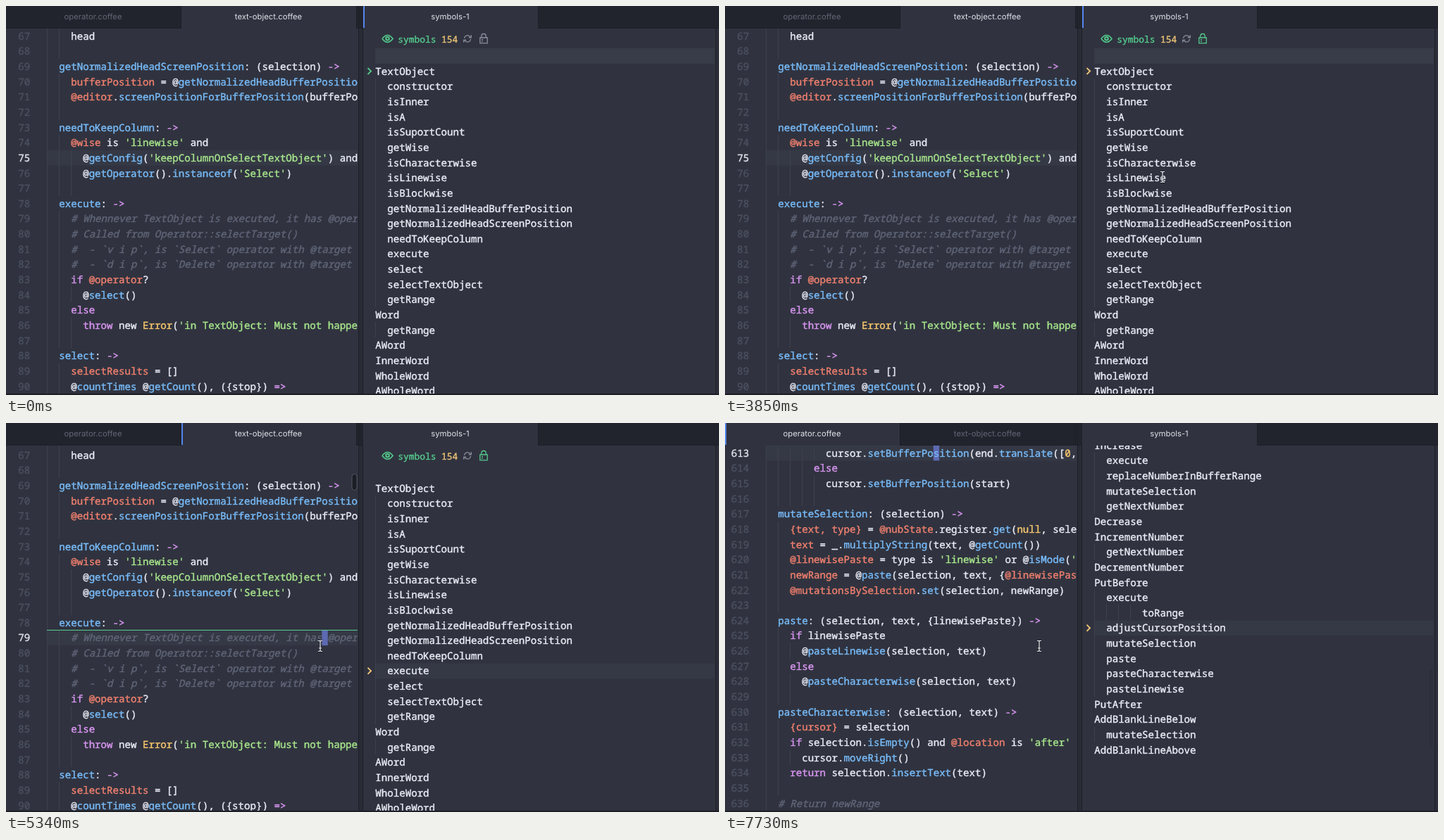
These frames come from a looping animation (1012x553 px, 8 s). An HTML page with a canvas:

```html
<!DOCTYPE html>
<html lang="en">
<head>
<meta charset="utf-8">
<title>Symbol list</title>
<style>
  html, body { margin: 0; width: 100%; height: 100%; overflow: hidden; background: #30333f; }
  canvas { display: block; }
</style>
</head>
<body>
<canvas id="stage" width="1012" height="553"></canvas>
<script>
const ctx = document.getElementById('stage').getContext('2d');
const LOOP = 8000, ROW = 21.65, CHAR = 8.478;
const CODE_X = 58.3, LIST_X = 524.3, TOP = 31.8;
const MONO = '"Noto Sans Mono", "DejaVu Sans Mono", monospace';
const CODE_FONT = `14.13px ${MONO}`;
const TAB_FONT = '11.3px Inter, Roboto, sans-serif';

const BG = '#30333f', BAR = '#21242c', EDGE = '#1c1f26', GUIDE = '#3d414e';
const ACTIVE = '#353945', BLUE = '#5686f0', BLOCK = '#5d69b1';
const GREEN = '#54ca8d', YELLOW = '#ecc376', GREY = '#8b909e';
const INK = {
  w: '#ebeef8', b: '#79bdfb', r: '#f2806f', p: '#da96f3',
  g: '#a9e88d', y: '#f9c86e', c: '#606578'
};

// Each run is separated by "|" and begins with its colour key.
const objectCode = `    whead

  bgetNormalizedHeadScreenPosition|w: (selection) |p->
    rbufferPosition|w = @|bgetNormalizedHeadBufferPosition
    r@editor|w.|bscreenPositionForBufferPosition|w(bufferPosition)

  bneedToKeepColumn|w: |p->
    r@wise|w is |g'linewise'|w and
      w@|bgetConfig|w(|g'keepColumnOnSelectTextObject'|w) and
      w@|bgetOperator|w().|binstanceof|w(|g'Select'|w)

  bexecute|w: |p->
    c# Whennever TextObject is executed, it has @operator
    c# Called from Operator::selectTarget()
    c#  - \`v i p\`, is \`Select\` operator with @target
    c#  - \`d i p\`, is \`Delete\` operator with @target
    pif |r@operator|w?
      w@|bselect|w()
    pelse
      pthrow |wnew |yError|w(|g'in TextObject: Must not happen'

  bselect|w: |p->
    rselectResults|w = []
    w@|bcountTimes|w @|bgetCount|w(), ({stop}) |p=>`;

const operatorCode = `          wcursor.|bsetBufferPosition|w(end.|btranslate|w([|y0|w, 0]
        pelse
          wcursor.|bsetBufferPosition|w(start)

  bmutateSelection|w: (selection) |p->
    r{text, type}|w = |r@nubState|w.register.|bget|w(|ynull|w, selection)
    rtext|w = _.|bmultiplyString|w(text, @|bgetCount|w())
    r@linewisePaste|w = type is |g'linewise'|w or @|bisMode|w(|g'
    rnewRange|w = @|bpaste|w(selection, text, {|r@linewisePaste
    r@mutationsBySelection|w.|bset|w(selection, newRange)

  bpaste|w: (selection, text, {linewisePaste}) |p->
    pif |wlinewisePaste
      w@|bpasteLinewise|w(selection, text)
    pelse
      w@|bpasteCharacterwise|w(selection, text)

  bpasteCharacterwise|w: (selection, text) |p->
    r{cursor}|w = selection
    pif |wselection.|bisEmpty|w() and |r@location|w is |g'after'
      wcursor.|bmoveRight|w()
    preturn |wselection.|binsertText|w(text)

  c# Return newRange`;

const objectList = `TextObject
  constructor
  isInner
  isA
  isSuportCount
  getWise
  isCharacterwise
  isLinewise
  isBlockwise
  getNormalizedHeadBufferPosition
  getNormalizedHeadScreenPosition
  needToKeepColumn
  execute
  select
  selectTextObject
  getRange
Word
  getRange
AWord
InnerWord
WholeWord
AWholeWord`;

const foldList = `InnerIndentation
Comment
  getRange
AComment
InnerComment
Fold
  adjustRowRange
  getFoldRowRangesContainsForRow
  getRange
AFold
InnerFold
Function
  getFoldRowRangesContainsForRow
  adjustRowRange
AFunction
InnerFunction
CurrentLine
  getRange
ACurrentLine
InnerCurrentLine
Entire
  getRange
AEntire
InnerEntire
All`;

const putList = `Increase
  execute
  replaceNumberInBufferRange
  mutateSelection
  getNextNumber
Decrease
IncrementNumber
  getNextNumber
DecrementNumber
PutBefore
  execute
        toRange
  adjustCursorPosition
  mutateSelection
  paste
  pasteCharacterwise
  pasteLinewise
PutAfter
AddBlankLineBelow
  mutateSelection
AddBlankLineAbove`;

function parse(text, plain) {
  const rows = text.split('\n').map(line => {
    const body = line.trimStart();
    const runs = plain ? ['w' + body] : body ? body.split('|') : [];
    return { indent: line.length - body.length, runs };
  });
  rows.forEach((row, i) => {
    if (row.runs.length) return;
    row.indent = Math.max(rows[i - 1].indent, rows[i + 1].indent);
  });
  return rows;
}

const code = { object: parse(objectCode), operator: parse(operatorCode) };
const lists = {
  object: parse(objectList, true),
  fold: parse(foldList, true),
  put: parse(putList, true)
};

const blinkOn = [[290, 740], [1190, 1490], [1940, 2240], [2680, 3120], [3420, 3850], [4300, 4450]];

// time, x, y
const pointer = [
  [1490, 944, 472], [1640, 942, 433], [1940, 920, 385], [2090, 850, 275],
  [2240, 760, 168], [2380, 693, 117], [2530, 681, 80], [2680, 677, 58],
  [2830, 676, 49], [3420, 668, 88], [3570, 645, 160], [3700, 626, 224],
  [3850, 621, 243], [4150, 612, 276], [4300, 594, 332], [4450, 588, 352],
  [4900, 556, 345], [5040, 480, 323], [5190, 446, 317]
];

function rect(x, y, w, h, color) {
  ctx.fillStyle = color;
  ctx.fillRect(x, y, w, h);
}

function text(str, x, y, color, font, align = 'left') {
  ctx.font = font;
  ctx.fillStyle = color;
  ctx.textAlign = align;
  ctx.fillText(str, x, y);
}

// Code is set slightly heavier than the regular weight.
function monoText(str, x, y, color, font = CODE_FONT, align = 'left') {
  text(str, x, y, color, font, align);
  ctx.strokeStyle = color;
  ctx.lineWidth = 0.4;
  ctx.strokeText(str, x, y);
}

function stroke(color, width, draw) {
  ctx.strokeStyle = color;
  ctx.lineWidth = width;
  ctx.beginPath();
  draw();
  ctx.stroke();
}

function line(...pts) {
  ctx.moveTo(pts[0], pts[1]);
  for (let i = 2; i < pts.length; i += 2) ctx.lineTo(pts[i], pts[i + 1]);
}

function clipped(x, y, w, h, draw) {
  ctx.save();
  ctx.beginPath();
  ctx.rect(x, y, w, h);
  ctx.clip();
  draw();
  ctx.restore();
}

const baseline = y => Math.round(y + 15.9);

function rowBand(x, y, w) {
  rect(x, y, w, ROW, ACTIVE);
}

function block(x, y, col) {
  rect(x + col * CHAR, y, CHAR, ROW, BLOCK);
}

function drawRow(row, x, y) {
  for (let col = 0; col < row.indent; col += 2) {
    rect(Math.round(x + col * CHAR), Math.floor(y), 1, 22, GUIDE);
  }
  let col = row.indent;
  for (const run of row.runs) {
    const str = run.slice(1);
    const font = run[0] === 'c' ? 'italic ' + CODE_FONT : CODE_FONT;
    monoText(str, x + col * CHAR, baseline(y), INK[run[0]], font);
    col += str.length;
  }
}

function tab(label, x, w, shown, focused) {
  rect(x, 0, w, shown ? 32 : 31, shown ? BG : BAR);
  rect(x + w, 0, 1, 31, EDGE);
  if (focused) rect(x, 0, 2, 31, BLUE);
  text(label, x + w / 2 - 0.5, 19, shown ? '#dfe2ea' : '#636776', TAB_FONT, 'center');
}

function drawTabs(s) {
  rect(0, 0, 1012, 31, BAR);
  rect(0, 31, 1012, 1, EDGE);
  tab('operator.coffee', 0, 248, s.operator, s.operator);
  tab('text-object.coffee', 249, 248, !s.operator, s.editor && !s.operator);
  tab('symbols-1', 507, 248, true, !s.editor);
}

function drawCode(s, t) {
  const rows = s.operator ? code.operator : code.object;
  const first = s.operator ? 613 : 67;
  const top = TOP + (s.preview && !s.operator ? 3 : 0);
  const active = s.operator ? 0 : s.editor ? 12 : 8;
  const rowY = i => top + i * ROW;
  clipped(0, 32, 499, 519, () => {
    rowBand(58, rowY(active), 441);
    if (s.editor) block(CODE_X, rowY(active), s.operator ? 28 : 46);
    if (top > TOP) {
      rect(58, 32, 1, 4, GUIDE);
      rect(75, 32, 1, 4, GUIDE);
    }
    rows.forEach((row, i) => {
      const color = i === active ? '#dfe2ea' : '#4b5060';
      monoText(first + i, 34.3, baseline(rowY(i)), color, CODE_FONT, 'right');
      drawRow(row, CODE_X, rowY(i));
    });
    if (s.preview && t < 5790) rect(58, 294, 441, 1, GREEN);
    if (s.preview && t < 5940) {
      ctx.globalAlpha = t < 5790 ? 1 : 0.5;
      scrollbar(491, 72.5, 7, 23);
      ctx.globalAlpha = 1;
    }
  });
}

function scrollbar(x, y, w, h) {
  ctx.beginPath();
  ctx.roundRect(x, y, w, h, w / 2);
  ctx.fillStyle = '#1c1e25';
  ctx.fill();
  ctx.strokeStyle = '#535762';
  ctx.lineWidth = 1;
  ctx.stroke();
}

function drawHeader(locked) {
  stroke(GREEN, 1.7, () => {
    ctx.moveTo(534, 46.5);
    ctx.quadraticCurveTo(541.5, 36.5, 549, 46.5);
    ctx.quadraticCurveTo(541.5, 56.5, 534, 46.5);
  });
  stroke(GREEN, 2, () => ctx.arc(541.5, 46.3, 2.3, 0, 7));
  const font = `12.9px ${MONO}`;
  monoText('symbols', 556.3, 52, GREEN, font);
  monoText('154', 618, 52, YELLOW, font);

  stroke(GREY, 1.3, () => {
    ctx.arc(655, 46.5, 4.6, 3.3, 5.8);
    ctx.moveTo(659.6, 47);
    ctx.arc(655, 46.5, 4.6, 0.15, 2.65);
    line(660.3, 41.3, 660.3, 44.8, 656.8, 44.8);
    line(649.7, 51.8, 649.7, 48.3, 653.2, 48.3);
  });

  stroke(locked ? GREEN : GREY, 1.3, () => {
    ctx.rect(672.8, 45, 10.4, 7.8);
    ctx.moveTo(674.8, 45);
    ctx.lineTo(674.8, 42.7);
    ctx.arc(678, 42.7, 3.2, Math.PI, 0);
    ctx.lineTo(681.2, 45);
    line(675, 47.7, 677, 47.7);
    line(675, 50.2, 677, 50.2);
  });
}

function chevron(y, color) {
  stroke(color, 2, () => line(513.5, y - 4.5, 518, y, 513.5, y + 4.5));
}

function drawList(s, t) {
  const atTop = !s.operator;
  const rows = lists[atTop ? 'object' : t < 7140 ? 'fold' : 'put'];
  const top = atTop ? 81.8 : 20.8;
  const rowY = i => top + i * ROW;
  const current = s.picked ? 12 : 0;
  clipped(507, 32, 499, 519, () => {
    if (atTop) drawHeader(s.locked);
    if (s.picked) rowBand(524, rowY(current), 482);
    else rect(524, 60, 482, 22, '#383c48');
    if (blinkOn.some(([a, b]) => t >= a && t < b)) rect(524, 60, 2, 22, BLOCK);
    if (s.picked && !s.editor) block(LIST_X, rowY(current), 7);
    rows.forEach((row, i) => drawRow(row, LIST_X, rowY(i)));
    chevron(rowY(current) + 10.8, s.locked ? YELLOW : GREEN);
    if (t >= 7140) {
      ctx.globalAlpha = t < 7730 ? 1 : 0.15;
      scrollbar(998.5, 348.5, 7, 114);
      ctx.globalAlpha = 1;
    }
  });
}

function drawFrameEdges() {
  rect(500, 32, 7, 519, '#292c36');
  rect(500, 0, 1, 553, EDGE);
  rect(506, 32, 1, 521, EDGE);
  rect(1007, 32, 1, 521, EDGE);
  rect(1008, 32, 4, 521, '#2c2f3a');
  rect(0, 551, 1012, 2, EDGE);
}

function drawPointer(t) {
  const spot = pointer.filter(p => t >= p[0]).pop();
  if (!spot) return;
  const [, x, y] = spot;
  const shape = () => {
    line(x - 3, y - 7.5, x - 1, y - 7.5, x, y - 6.5, x + 1, y - 7.5, x + 3, y - 7.5);
    line(x, y - 6.5, x, y + 6.5);
    line(x - 3, y + 7.5, x - 1, y + 7.5, x, y + 6.5, x + 1, y + 7.5, x + 3, y + 7.5);
    line(x - 2, y + 3, x + 2, y + 3);
  };
  stroke('rgba(20,22,28,.75)', 2.6, shape);
  stroke('#eef0f4', 1.2, shape);
}

function draw(t) {
  const s = {
    locked: t >= 3120,
    picked: t >= 4450,
    preview: t >= 4600,
    editor: t >= 5340,
    operator: t >= 6990
  };
  ctx.textRendering = 'geometricPrecision';
  rect(0, 0, 1012, 553, BG);
  drawTabs(s);
  drawCode(s, t);
  drawList(s, t);
  drawFrameEdges();
  drawPointer(t);
}

const start = performance.now();
function tick() {
  draw((performance.now() - start) % LOOP);
  requestAnimationFrame(tick);
}
tick();
</script>
</body>
</html>
```
